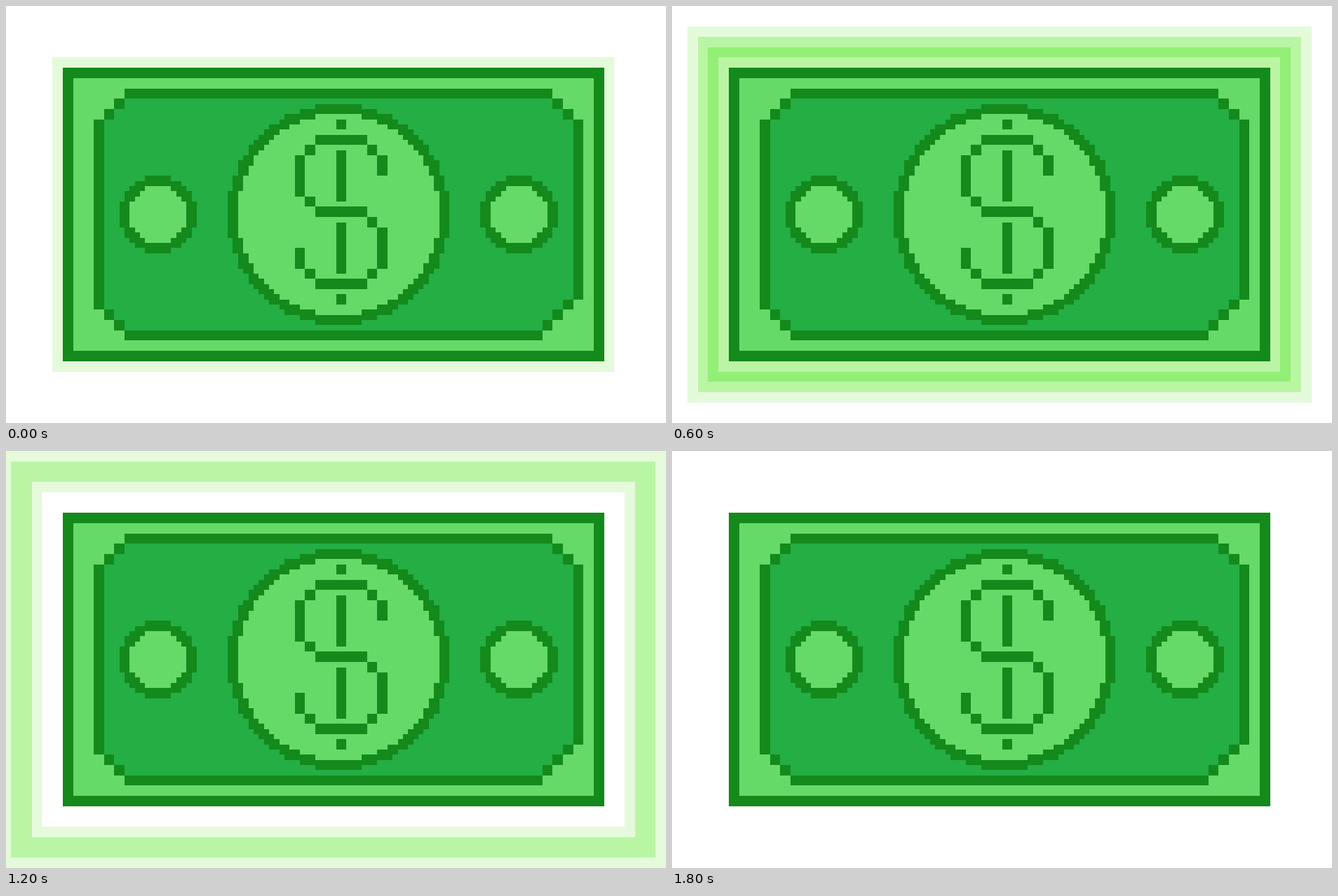
An HTML page with a canvas for the animation above (2 s loop, 941 by 595 pixels).

```html
<!DOCTYPE html>
<html lang="en">
<head>
<meta charset="utf-8">
<title>Pulsing banknote</title>
<style>
  html, body { margin: 0; width: 100%; height: 100%; overflow: hidden; background: #fff; }
  canvas { display: block; width: 941px; height: 595px; image-rendering: pixelated; }
</style>
</head>
<body>
<canvas id="stage" width="128" height="81"></canvas>
<script>
const ctx = document.getElementById('stage').getContext('2d');
const DARK = '#14891c', MID = '#24ae44', LIGHT = '#66da68';
const GLOW = { W: '#fff', L: '#e4fadb', M: '#baf5a4', B: '#93ef75' };

// Ring colours from the note outwards, one string per 200 ms step.
const STEPS = ['LWWWWW', 'MLWWWW', 'BMLWWW', 'MBMLWW', 'LMBMWW',
               'WLMBLW', 'WWLMML', 'WWWLLL', 'WWWWWL', 'WWWWWW'];

// Fills the box between two corners, in art pixels.
function box(color, x0, y0, x1, y1) {
  ctx.fillStyle = color;
  ctx.fillRect(x0, y0, x1 - x0, y1 - y0);
}

function disc(color, cx, cy, r) {
  for (let dy = 0.5 - r; dy < r; dy++) {
    const half = Math.floor(Math.sqrt(r * r - dy * dy)) + 0.5;
    box(color, cx - half, cy + dy - 0.5, cx + half, cy + dy + 0.5);
  }
}

function medallion(cx, r) {
  disc(DARK, cx, 40.5, r);
  disc(LIGHT, cx, 40.5, r - 2);
}

// Two-pixel square dots
const dots = (...points) => points.forEach(([x, y]) => box(DARK, x, y, x + 2, y + 2));

function drawPanel() {
  box(MID, 23, 18, 104, 63);
  box(MID, 21, 20, 106, 61);
  box(MID, 19, 22, 108, 59);
  box(MID, 104, 18, 106, 20);
  box(MID, 106, 20, 108, 22);
  box(MID, 108, 22, 110, 57);
  box(DARK, 23, 16, 106, 18);
  box(DARK, 23, 63, 104, 65);
  box(DARK, 17, 22, 19, 59);
  box(DARK, 110, 22, 112, 57);
  dots([21, 18], [19, 20], [19, 59], [21, 61],
       [106, 18], [108, 20], [108, 57], [106, 59], [104, 61]);
}

function drawDollar() {
  for (const y of [25, 39, 53]) box(DARK, 60, y, 70, y + 2);
  for (const y of [28, 42]) box(DARK, 64, y, 66, y + 10);
  box(DARK, 56, 29, 58, 37);
  box(DARK, 72, 29, 74, 33);
  box(DARK, 72, 43, 74, 51);
  box(DARK, 56, 47, 58, 51);
  dots([64, 22], [64, 56], [58, 27], [70, 27], [58, 37], [70, 41], [58, 51], [70, 51]);
}

function draw(step) {
  for (let ring = 6; ring > 0; ring--) {
    const d = 2 * ring;
    box(GLOW[STEPS[step][ring - 1]], 11 - d, 12 - d, 116 + d, 69 + d);
  }
  box(DARK, 11, 12, 116, 69);
  box(LIGHT, 13, 14, 114, 67);
  drawPanel();
  medallion(29.5, 7.5);
  medallion(64.5, 21.5);
  medallion(99.5, 7.5);
  drawDollar();
}

function tick() {
  draw(Math.floor(performance.now() / 200) % STEPS.length);
  requestAnimationFrame(tick);
}
tick();
</script>
</body>
</html>
```
